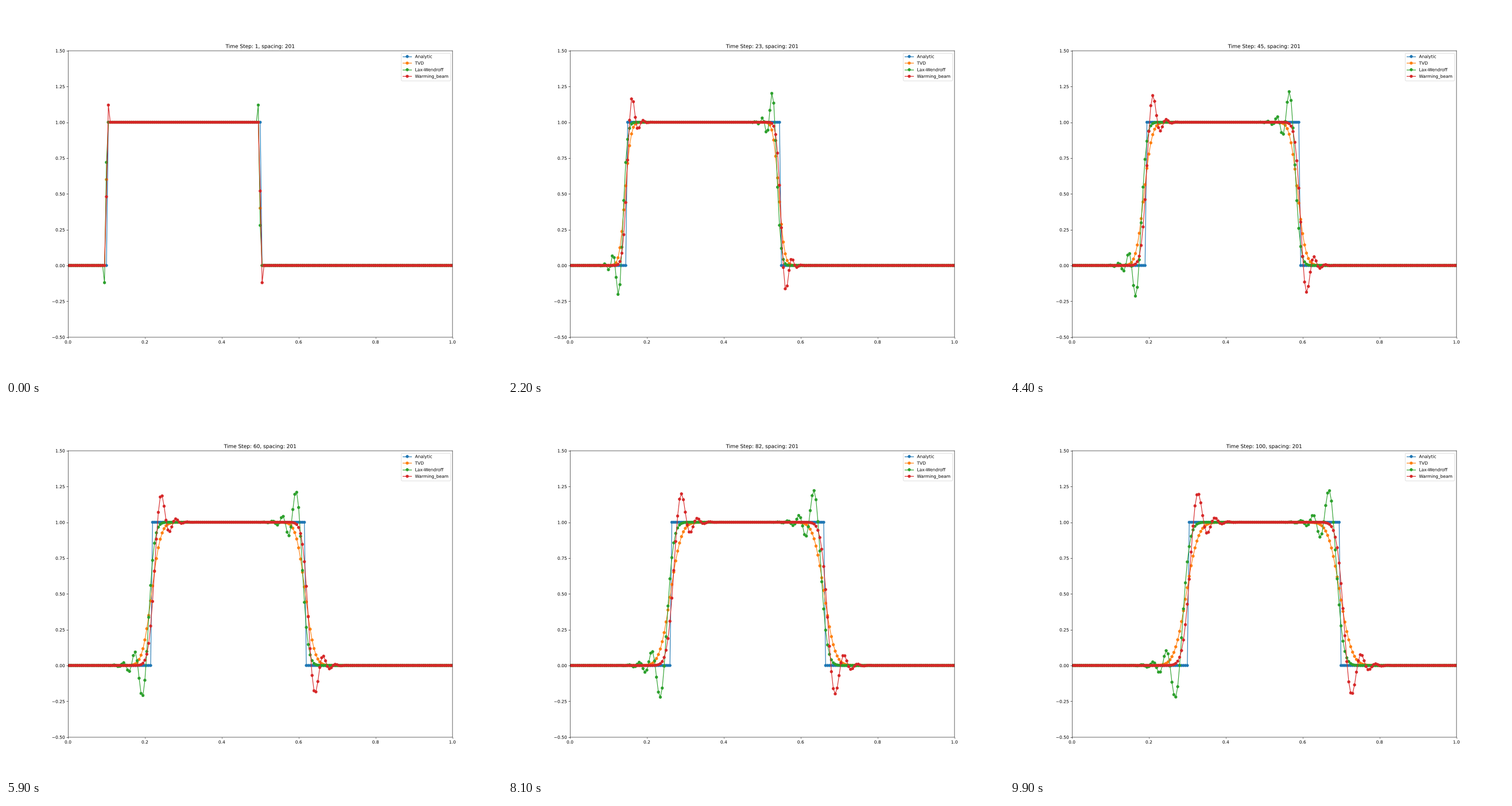
These frames come from a looping animation (864x648 px, 10000 ms). A matplotlib script:

```python
import numpy as np
import matplotlib.pyplot as plt
from matplotlib.animation import FuncAnimation
from matplotlib.lines import Line2D
from matplotlib.patheffects import Normal, Stroke

# text and legend keys as paths, so they are not rounded to whole pixels
plt.rcParams["text.hinting"] = "none"
plt.rcParams["path.effects"] = [Normal()]

N, STEPS = 201, 100
SPEED = 0.4
x = np.linspace(0, 1, N)
dx = dt = 0.005
c = SPEED * dt / dx


def pulse(s):
    return ((s >= 0.1) & (s < 0.5)).astype(float)


def back(u, k=1):
    return np.roll(u, k)


def upwind(u):
    return u - c * (u - back(u))


def lax_wendroff(u):
    left, right = back(u), back(u, -1)
    return u - c / 2 * (right - left) + c**2 / 2 * (right - 2 * u + left)


def warming_beam(u):
    u1, u2 = back(u), back(u, 2)
    return u - c / 2 * (3 * u - 4 * u1 + u2) + c**2 / 2 * (u - 2 * u1 + u2)


def solve(scheme):
    rows = [pulse(x)]
    for _ in range(STEPS):
        rows.append(scheme(rows[-1]))
    return rows


series = {
    "Analytic": [pulse(x - SPEED * (n * dt)) for n in range(STEPS + 1)],
    "TVD": solve(upwind),
    "Lax-Wendroff": solve(lax_wendroff),
    "Warming_beam": solve(warming_beam),
}

fig, ax = plt.subplots(figsize=(16, 12), dpi=54)
ax.set_xlim(0, 1)
ax.set_ylim(-0.5, 1.5)
title = ax.set_title("")
for spine in ax.spines.values():
    spine.set(snap=False, path_effects=[Stroke(offset=(0.36, -0.36))])

plots, handles = [], []
for k, (name, rows) in enumerate(series.items()):
    color = f"C{k}"
    z = 2 + k / 10
    line, = ax.plot(x, rows[1], color=color, zorder=z)
    # one colour per dot keeps sub-pixel positions
    dots = ax.scatter(x, rows[1], s=36, color=[color] * N, linewidths=1,
                      zorder=z + 0.05, path_effects=[])
    plots.append((line, dots, rows))
    handles.append(Line2D([], [], color=color, marker="o", label=name))
ax.legend(handles=handles, loc="upper right")


def update(i):
    step = i + 1
    for line, dots, rows in plots:
        line.set_ydata(rows[step])
        dots.set_offsets(np.column_stack([x, rows[step]]))
    title.set_text(f"Time Step: {step}, spacing: {N}")
    return []


anim = FuncAnimation(fig, update, frames=STEPS, interval=100, repeat=True, repeat_delay=0)
plt.show()
```
